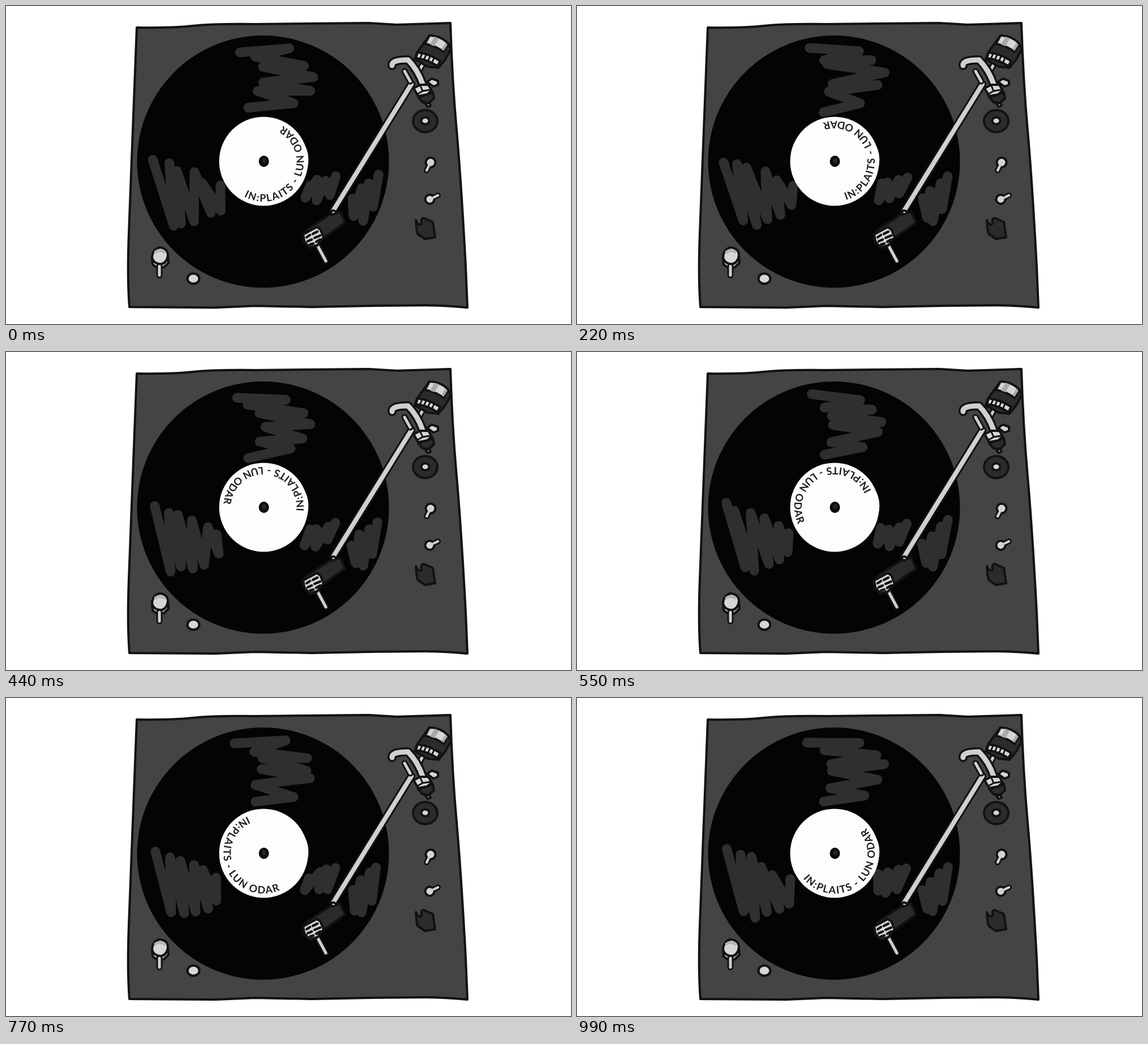
Recreate the animation shown at these times as an HTML page. Size 998 px wide and 561 px high, loop 1.1 s.

```html
<!DOCTYPE html>
<html lang="en">
<head>
<meta charset="utf-8">
<title>Turntable</title>
<style>
  html, body { margin: 0; height: 100%; overflow: hidden; background: #fff; }
  svg { display: block; width: 100%; height: 100%; }
  .ink { stroke: #121212; stroke-width: 4; stroke-linejoin: round; stroke-linecap: round; }
  .light { fill: #d6d6d6; }
  .shade { fill: #a9a9a9; }
  .dark { fill: #2b2b2b; }
  .line { fill: none; stroke-linecap: round; stroke-linejoin: round; }
  .rim { stroke: #121212; }
  .metal { stroke: #d0d0d0; }
  #shine { stroke: #2f2f2f; stroke-width: 17; }
  text { font: 700 18px Lato, sans-serif; letter-spacing: 1.7px; fill: #1c1c1c; }
</style>
</head>
<body>
<svg viewBox="0 0 998 561">
  <defs><path id="arc" d="M71 0A71 71 0 0 0-71 0A71 71 0 0 0 71 0"/></defs>

  <path class="ink" fill="#444" d="M231 38Q290 39 330 35T440 32L640 30 690 33 785 30
    Q788 130 796 220T812 460L815 532Q770 528 740 528T640 529L540 531 440 529 370 532 218 531
    Q214 480 217 400L222 270Z"/>
  <circle cx="454" cy="274.5" r="222.5" fill="#040404"/>
  <g id="shine" class="line"></g>

  <circle cx="455" cy="274" r="78.5" fill="#fdfdfd"/>
  <path fill="#fdfdfd" d="M528 246Q538 264 532 288Z"/>
  <g id="title"><text><textPath href="#arc">IN:PLAITS - LUN ODAR</textPath></text></g>
  <ellipse cx="455.500" cy="274" rx="9" ry="10" fill="#0a0a0a"/>
  <ellipse cx="456" cy="273" rx="4" ry="5" fill="#242424"/>

  <g id="rods"></g>

  <!-- cartridge -->
  <path class="ink dark" d="M524 404L532 394 572 368 590 363 599 382 558 411 549 423 536 427 526 416Z"/>
  <path class="ink light" d="M525 403L549 390 555 394 561 408 550 422 536 426 527 415Z"/>
  <path class="line rim" stroke-width="4.500" d="M531 408l6-4M533 415l7-3M537 421l6-2M542 402l8-4M545 409l10-4M548 416l7-4"/>
  <path class="ink light" stroke-width="3" d="M573 364Q578 357 584 365L577 368Z"/>

  <!-- counterweight -->
  <path class="ink dark" d="M748 52L781 66 786 76 776 94 764 109 745 107 722 94 726 82Z"/>
  <path class="ink light" d="M748 52Q767 52 781 66L773 81Q757 69 740 67Z"/>
  <path class="shade" d="M757 54L765 57 757 71 749 68ZM776 65L780 68 773 79 769 76Z"/>
  <path class="ink light" d="M727 82Q748 84 767 97L762 106Q744 94 724 92Z"/>
  <path class="line rim" stroke-width="3" d="M735 84l-4 9M742 86l-4 9M749 89l-4 9M756 92l-4 9"/>

  <!-- pivot -->
  <path class="ink light" d="M744 134L752 128 763 132 763 139 755 142Z"/>
  <g id="arch"></g>
  <path class="ink dark" d="M728 161L754 152 756 163 747 171 736 170Z"/>
  <path class="ink light" d="M720 145L732 139 746 139 752 149 744 156 728 159Z"/>
  <path class="line rim" stroke-width="3" d="M732 141L736 150 727 155M736 150L748 148"/>
  <path class="ink light" d="M741 173L748 171 750 176 745 178Z"/>

  <!-- controls -->
  <ellipse class="ink dark" cx="740.500" cy="203" rx="21.500" ry="19.500"/>
  <ellipse class="ink light" cx="740.500" cy="202.500" rx="7" ry="6"/>
  <g id="knobs"></g>
  <path class="ink dark" d="M724 378Q729 389 734 384 732 374 738 374L754 381 758 408 740 411 727 402 725 393Z"/>
  <path class="ink shade" d="M258 446L259 456 267 462 279 461 287 453 286 440Z"/>
  <g id="lever"></g>
  <path class="ink light" d="M258 443Q259 429 271 426Q285 427 286 439Q285 452 275 455Q260 455 258 443Z"/>
  <path class="line" stroke="#b5b5b5" stroke-width="5" d="M264 434Q270 429 280 434"/>
  <ellipse class="ink light" cx="331" cy="481" rx="10.500" ry="9"/>
</svg>
<script>
const STEP = 110;
// Rotation of the label's first letter at each step, in degrees.
const ANGLES = [114.6, 92, 69, 35, 1, -29, -67, -118, -170, -223];

const byId = id => document.getElementById(id);
function add(parent, tag, attrs) {
  const el = document.createElementNS("http://www.w3.org/2000/svg", tag);
  for (const name in attrs) el.setAttribute(name, attrs[name]);
  return parent.appendChild(el);
}

// A metal bar with a dark outline.
function rod(id, d, width, rim = 6) {
  add(byId(id), "path", { class: "line rim", "stroke-width": width + rim, d });
  add(byId(id), "path", { class: "line metal", "stroke-width": width, d });
}
function knob(x, y, r, dx, dy) {
  const stick = `M${x} ${y}l${dx} ${dy}`;
  rod("knobs", stick, 4);
  add(byId("knobs"), "circle", { class: "ink light", cx: x, cy: y, r });
  add(byId("knobs"), "path", { class: "line metal", "stroke-width": 4, d: stick });
}
rod("rods", "M578 361L716 138", 8);
rod("rods", "M551 424L565 450", 5);
rod("rods", "M735 105L730 114", 5);
rod("arch", "M704 115L714 133", 5);
rod("arch", "M682 105Q680 95 710 95Q727 112 736 138", 9, 7);
rod("lever", "M271 459V475", 5);
knob(750, 276, 8.5, -7, 14);
knob(748.5, 341, 8, 14.500, -7);

// Each shine is a zigzag between two curved edges (three control points each).
const SHINES = [
  { n: 11, wobble: 15, a: [[410, 79], [478, 110], [434, 180]], b: [[480, 72], [590, 115], [488, 186]] },
  { n: 11, wobble: 13, a: [[264, 272], [310, 285], [376, 320]], b: [[285, 380], [335, 395], [388, 348]] },
  { n: 7, wobble: 8, a: [[535, 314], [560, 308], [584, 301]], b: [[522, 338], [548, 346], [578, 330]] },
  { n: 7, wobble: 6, a: [[610, 340], [635, 315], [656, 298]], b: [[612, 360], [625, 408], [655, 335]] }
].map(shine => ({ ...shine, el: add(byId("shine"), "polyline", {}) }));

function random(seed) {
  const v = Math.sin(seed * 127.1 + 11.7) * 43758.5453;
  return v - Math.floor(v);
}
const curve = ([p, q, r], t, axis) =>
  (1 - t) ** 2 * p[axis] + 2 * t * (1 - t) * q[axis] + t * t * r[axis];

function zigzag({ n, wobble, a, b }, seed) {
  return Array.from({ length: n }, (_, i) => [0, 1].map(axis => {
    const jitter = (random(seed * 100 + i * 2 + axis) - .5) * wobble;
    return curve(i % 2 ? b : a, i / (n - 1), axis) + jitter;
  })).join(" ");
}

let shown = -1;
function draw(now) {
  const step = Math.floor(now / STEP) % ANGLES.length;
  if (step !== shown) {
    shown = step;
    SHINES.forEach((shine, i) => shine.el.setAttribute("points", zigzag(shine, step * 4 + i)));
    byId("title").setAttribute("transform", `translate(455 274) rotate(${ANGLES[step] + 4.5})`);
  }
  requestAnimationFrame(() => draw(performance.now() - start));
}
const start = performance.now();
draw(0);
</script>
</body>
</html>
```
